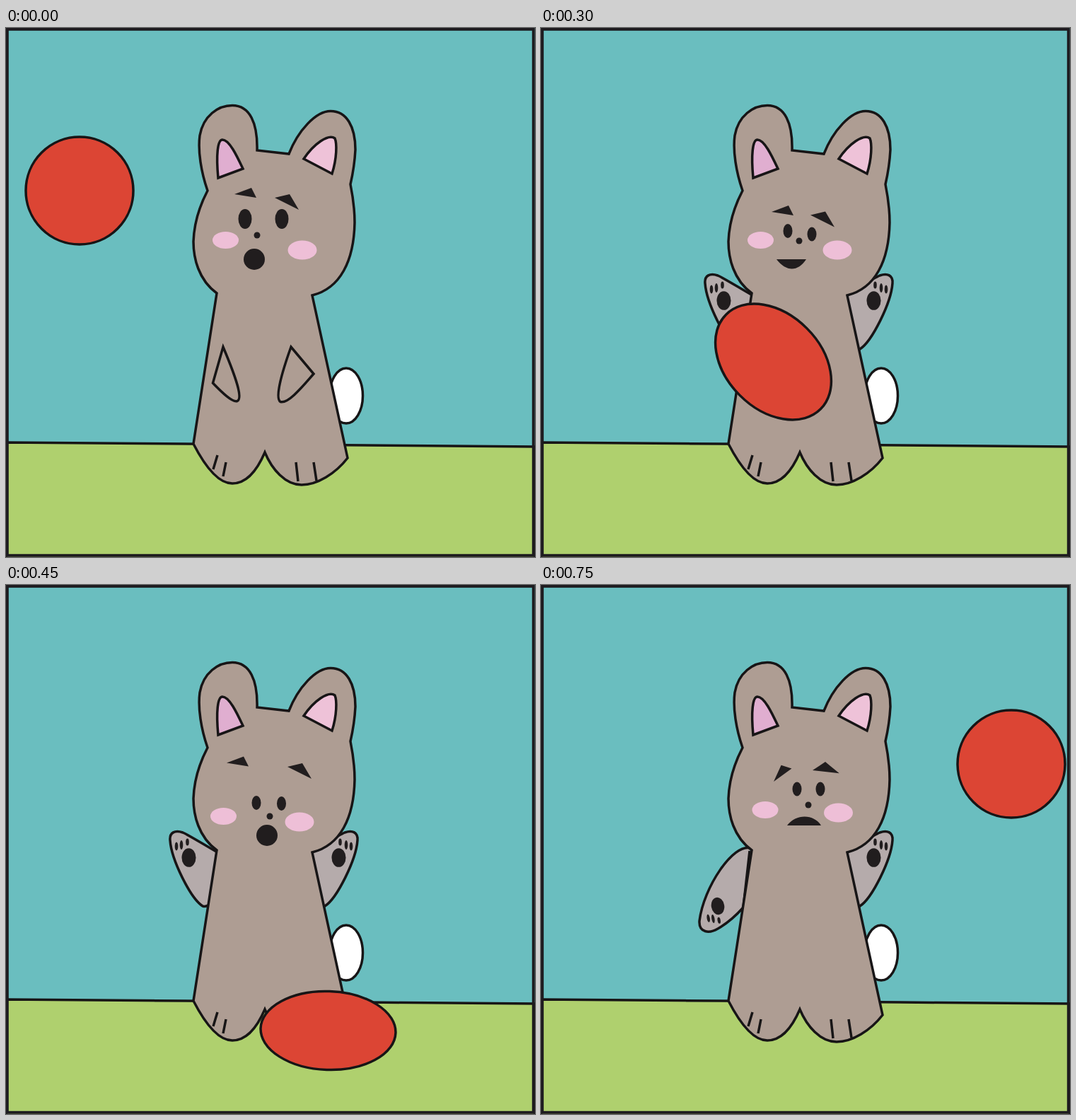
Recreate the animation shown at these times as an HTML page. Size 748x748 px, loop 900 ms.

```html
<!DOCTYPE html>
<html lang="en">
<head>
<meta charset="utf-8">
<title>Bunny and ball</title>
<style>
  html, body { margin: 0; width: 100%; height: 100%; overflow: hidden; }
  svg { display: block; width: 100%; height: 100%; }
  .line { stroke: #171516; stroke-width: 3.5; stroke-miterlimit: 10; }
  .fur { fill: #ae9d93; }
  .arm { fill: #b5abab; }
  .ink { fill: #211d1e; }
  .blush { fill: #eebfd7; }
  .ball { fill: #dc4534; }
</style>
</head>
<body>
<svg viewBox="0 0 748 748">
  <defs>
    <!-- Paw pads, centred on the large pad -->
    <g id="pads" class="ink">
      <ellipse rx="10" ry="13.3"/>
      <ellipse cx="2" cy="-22" rx="2.3" ry="5"/>
      <ellipse cx="10.5" cy="-18" rx="2.3" ry="6.5"/>
      <ellipse cx="17.5" cy="-16" rx="2.3" ry="6"/>
    </g>
    <g id="raisedArm">
      <path class="arm line" d="M430 378C451 366 470 354 479 350C490 346 498 350 497 361C495 389 468 443 451 454C445 456 437 450 430 440Z"/>
      <use href="#pads" x="470.5" y="385.5"/>
    </g>
  </defs>

  <rect width="748" height="748" fill="#6abebf"/>
  <path fill="#afd06e" class="line" d="M0 586L748 592V760H0Z"/>
  <ellipse class="line" cx="481" cy="520" rx="23.5" ry="39" fill="#fff"/>
  <g id="behind"></g>
  <path class="fur line" d="M298 375C272 356 265 325 265 302C266 274 274 251 285 230C276 204 271 174 274 152C279 124 300 109.500 320 109.500C345 109.500 356 135 355 173L400 178C413 145 438 117.500 459 117.500C482 117.500 494 140 494 172C493 192 490 208 487 221C491 241 493 258 493 275C492 329 473 368 433 378L483 608C466 630 440 646 418 646C395 646 376 624 366 600C354 628 338 644 320 644C300 644 281 619 265 588Z"/>
  <path class="line" fill="none" d="M299 604L293 624M311 614L307 634M410 614L413 641M435 614L439 640"/>
  <path class="line" fill="#e0aed0" d="M300 212C297 180 299 158 306 158C316 158 327 182 335 199Z"/>
  <path class="line" fill="#eec2d8" d="M421 185L461 206C468 184 468 163 465 156C456 149 435 164 421 185Z"/>
  <g id="face"></g>
  <g id="front"></g>
  <ellipse id="ball" class="ball line"/>
  <rect x="1.800" y="1.800" width="744" height="744" fill="none" stroke="#1d1b1f" stroke-width="4"/>
</svg>

<script>
const STEP = 150;
const $ = id => document.getElementById(id);

const use = (id, transform = '') => `<use href="#${id}" transform="${transform}"/>`;
const path = (cls, d, transform = '') => `<path class="${cls}" d="${d}" transform="${transform}"/>`;
const oval = (cls, x, y, rx, ry = rx) =>
  `<ellipse class="${cls}" cx="${x}" cy="${y}" rx="${rx}" ry="${ry}"/>`;

const mouths = {
  gasp: (x, y) => oval('ink', x, y, 15),
  smile: (x, y) => path('ink', 'M-21 0H21C9 18-7 18-21 0Z', `translate(${x} ${y})`),
  frown: (x, y) => path('ink', 'M-24 0H24C14-16-11-17-24 0Z', `translate(${x} ${y})`)
};

const rightUp = use('raisedArm');
const leftUp = use('raisedArm', 'translate(729 0) scale(-1 1)');
const leftDown =
  path('arm line', 'M296 372C272 365 230 427 224 475C223 492 238 493 250 486C264 478 277 466 286 456Q291 410 295 376') +
  use('pads', 'translate(250 454) rotate(170) scale(.92)');
const leftRest = path('fur line', 'M307 451L292.500 502C304 514 320 530 327 527.500C335 524 326 496 307 451Z');
const rightRest = path('fur line', 'M403 451L435 489C420 506 399 532 388 528.500C380 524 389 490 403 451Z');
const leftAcross =
  path('arm line', 'M297 376C316 364 342 351 355 351C366 352 368 362 364 373C350 411 310 462 288 455') +
  use('pads', 'translate(334.5 385.500)');

// Points are x, y pairs: left then right. Ball: x, y, rx, ry, angle.
const poses = [
  { ball: [104, 230, 76, 76, 0], brows: [323, 235, 380, 240], eyes: [338, 270, 390, 270], eyeSize: [9.5, 14],
    nose: [355, 293], cheeks: [310.500, 300, 419, 314], mouth: ['gasp', 351, 327],
    behind: '', front: leftRest + rightRest },
  { ball: [255, 360, 76, 76, 0], brows: [322, 249.500, 376, 257], eyes: [337, 282, 376.500, 287],
    nose: [355, 293], cheeks: [310.500, 300, 419, 314], mouth: ['smile', 354, 327],
    behind: rightUp, front: leftRest },
  { ball: [328.500, 472, 94.500, 67, 45], brows: [326, 260, 381, 264.500], eyes: [349, 287, 383, 291.500],
    nose: [365, 301], cheeks: [310.500, 300, 419, 314], mouth: ['smile', 354, 327],
    behind: rightUp + leftUp, front: '' },
  { ball: [455.500, 630, 95.500, 55.500, 2], brows: [312, 251.500, 398, 257], eyes: [354, 308, 389.500, 309],
    nose: [373, 327], cheeks: [307.500, 327, 415, 335], mouth: ['gasp', 369, 354],
    behind: rightUp + leftUp, front: '' },
  { ball: [572.500, 385.500, 94, 66, -52], brows: [330, 264, 384, 264], eyes: [362, 298, 395, 298],
    nose: [373, 327], cheeks: [307.500, 327, 415, 335], mouth: ['gasp', 369, 354],
    behind: rightUp, front: leftAcross },
  { ball: [665, 253, 76, 76, 0], brows: [329, 278, 384, 262], tilt: [-45, -20], eyes: [362, 288.500, 395, 288.500],
    nose: [378, 311], cheeks: [317, 318, 420.500, 322], mouth: ['frown', 372, 340],
    behind: rightUp + leftDown, front: '' }
];

function drawFace({ brows, tilt = [0, 0], eyes, eyeSize = [6.500, 10], nose, cheeks, mouth }) {
  const [shape, x, y] = mouth;
  return oval('blush', cheeks[0], cheeks[1], 18.500, 12) +
    oval('blush', cheeks[2], cheeks[3], 20.500, 13.500) +
    path('ink', 'M0 0L24-9L31 5Z', `translate(${brows[0]} ${brows[1]}) rotate(${tilt[0]})`) +
    path('ink', 'M0 0L21-5L34 17Z', `translate(${brows[2]} ${brows[3]}) rotate(${tilt[1]})`) +
    oval('ink', eyes[0], eyes[1], ...eyeSize) +
    oval('ink', eyes[2], eyes[3], ...eyeSize) +
    oval('ink', ...nose, 4.500) +
    mouths[shape](x, y);
}

function drawPose(pose) {
  const [x, y, rx, ry, angle] = pose.ball;
  $('behind').innerHTML = pose.behind;
  $('face').innerHTML = drawFace(pose);
  $('front').innerHTML = pose.front;
  $('ball').setAttribute('rx', rx);
  $('ball').setAttribute('ry', ry);
  $('ball').setAttribute('transform', `translate(${x} ${y}) rotate(${angle})`);
}

let shown = -1;
const start = performance.now();

function tick() {
  const index = Math.floor((performance.now() - start) / STEP) % poses.length;
  if (index !== shown) drawPose(poses[shown = index]);
  requestAnimationFrame(tick);
}
tick();
</script>
</body>
</html>
```
